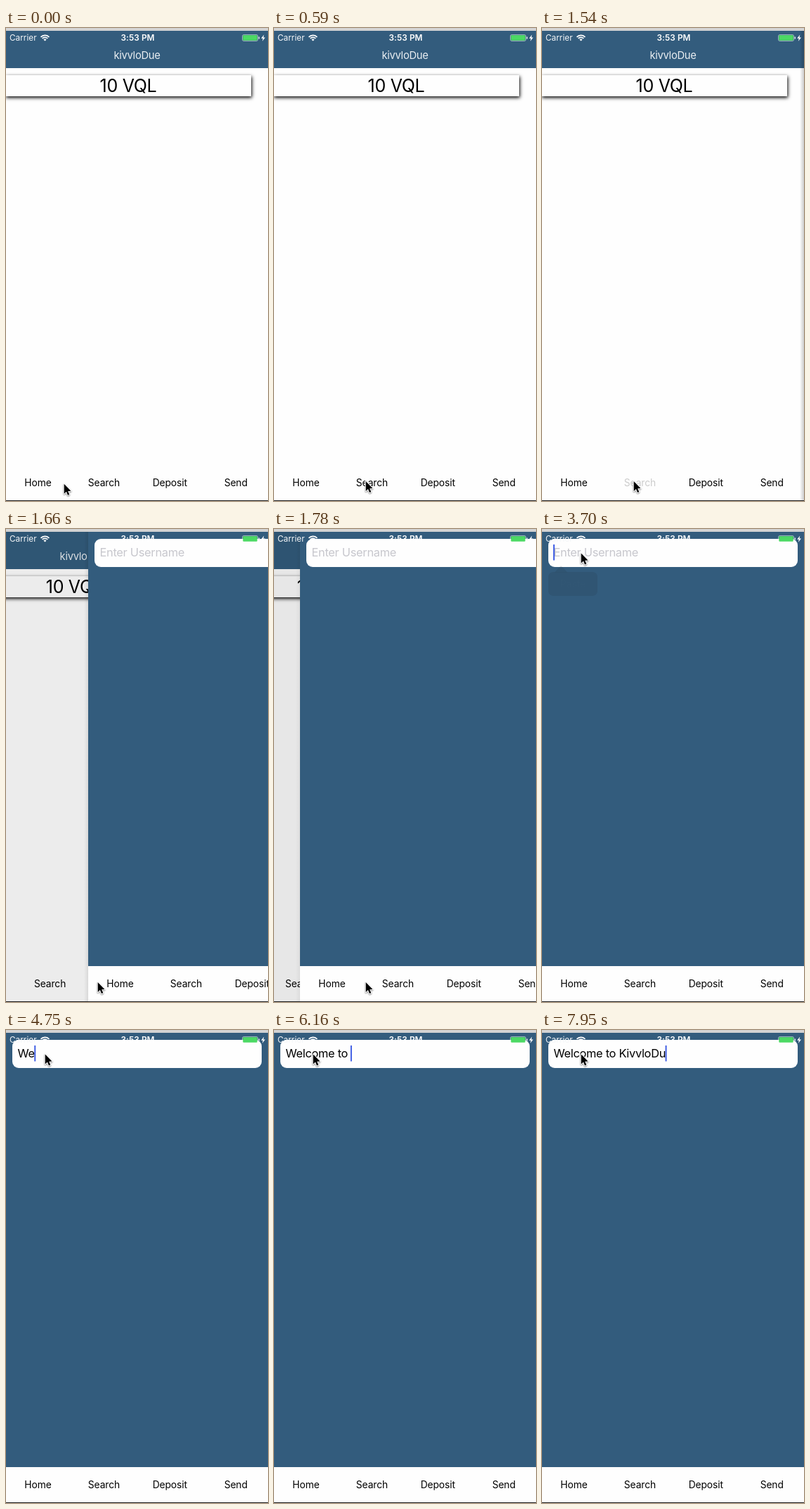
These frames come from a looping animation (373x672 px, 8000 ms). An HTML page with a canvas:

```html
<!DOCTYPE html>
<html lang="en">
<head>
<meta charset="utf-8">
<title>Wallet app</title>
<style>
  html, body { margin: 0; width: 100%; height: 100%; overflow: hidden; background: #fdfdfd; }
  canvas { display: block; width: 373px; height: 672px; }
</style>
</head>
<body>
<canvas id="stage"></canvas>
<script>
const W = 373, H = 672, LOOP = 8000;
const TICK = 118.4; // the screen refreshes once per tick
const BLUE = '#335c7d', WHITE = '#fefefe', MENU_COLOR = '#1b2024';

// Moments, counted in ticks
const PRESS = 7, SLIDE = 13, REACH_FIELD = 20, FOCUS = 27, MENU = 30, TYPE = 38;
const KEYS_PER_TICK = 'W||e|||lc|om||e||| |t|o| ||||K||i||v|v|l|o||D||u'.split('|');

const canvas = document.getElementById('stage');
const ctx = canvas.getContext('2d');
const ratio = window.devicePixelRatio || 1;
canvas.width = W * ratio;
canvas.height = H * ratio;

const clamp = v => Math.min(1, Math.max(0, v));
const ramp = (tick, start, length) => clamp((tick - start) / length);
const smooth = p => p * p * (3 - 2 * p);

function rect(x, y, w, h, fill) {
  ctx.fillStyle = fill;
  ctx.fillRect(x, y, w, h);
}

function rounded(x, y, w, h, r, fill) {
  ctx.beginPath();
  ctx.roundRect(x, y, w, h, r);
  ctx.fillStyle = fill;
  ctx.fill();
}

function polygon(points, fill) {
  ctx.beginPath();
  points.forEach(([x, y]) => ctx.lineTo(x, y));
  ctx.closePath();
  ctx.fillStyle = fill;
  ctx.fill();
}

function setShadow(color, blur, x, y) {
  ctx.shadowColor = color;
  ctx.shadowBlur = blur * ratio;
  ctx.shadowOffsetX = x * ratio;
  ctx.shadowOffsetY = y * ratio;
}

function setFont(size, spacing = 0, weight = 400) {
  ctx.font = `${weight} ${size}px Inter, sans-serif`;
  ctx.letterSpacing = spacing + 'px';
}

function label(text, x, y, fill, align = 'left') {
  ctx.textAlign = align;
  ctx.fillStyle = fill;
  ctx.fillText(text, x, y);
}

function withAlpha(alpha, paint) {
  ctx.save();
  ctx.globalAlpha = alpha;
  paint();
  ctx.restore();
}

function shifted(x, paint) {
  ctx.save();
  ctx.translate(x, 0);
  paint();
  ctx.restore();
}

function drawNav(searchAlpha = 1) {
  setFont(13.8, -0.1);
  ['Home', 'Search', 'Deposit', 'Send'].forEach((name, i) => {
    withAlpha(name === 'Search' ? searchAlpha : 1, () =>
      label(name, 45.5 + i * 93.9, 651, '#000', 'center'));
  });
}

function drawHome(tick) {
  rect(0, 4, W, H, WHITE);
  rect(0, 4, W, 53, BLUE);
  setFont(14.8, -0.3);
  label('kivvloDue', 186.5, 43.5, '#e9eef2', 'center');

  ctx.save();
  setShadow('#000', 5, 1, 2);
  rect(-1, 67, 350, 30, WHITE);
  ctx.restore();
  setFont(25, -0.3);
  label('10 VQL', 174, 91, '#000', 'center');
  drawNav(tick > SLIDE ? 1 : 1 - .8 * ramp(tick, PRESS, 2));
}

function drawMenu(alpha) {
  withAlpha(alpha, () => {
    rounded(9, 61, 70, 34, 7, MENU_COLOR);
    polygon([[18, 61.5], [27, 52], [36, 61.5]], MENU_COLOR);
  });
  setFont(14, -0.1);
  withAlpha(alpha * alpha, () => label('Paste', 44, 82.5, '#fff', 'center'));
}

function drawSearch(tick) {
  rect(0, 4, W, H, BLUE);
  rounded(9, 14, 355, 40, 9, WHITE);
  const typed = KEYS_PER_TICK.slice(0, Math.max(0, tick - TYPE + 1)).join('');
  setFont(16.4, -0.3);
  label(typed || 'Enter Username', 16.5, 39, typed ? '#000' : '#c7c7cd');

  const caretX = 16 + ctx.measureText(typed).width;
  const blink = clamp(.5 + 1.7 * Math.cos((tick - FOCUS) * Math.PI * 2 / 5));
  if (tick >= FOCUS) withAlpha(typed ? 1 : blink, () => rect(caretX, 22, 2, 22.5, '#4260e4'));

  const shown = ramp(tick, MENU, 3) ** 2 * (1 - ramp(tick, TYPE - 1, 2));
  drawMenu(shown);
  rect(0, 621, W, 51, WHITE);
  drawNav();
}

function drawScreens(tick) {
  if (tick < SLIDE) return drawHome(tick);
  const edge = Math.round(W * Math.pow(.3137, tick - SLIDE));
  const p = 1 - edge / W;
  shifted(-.3 * W * p, () => drawHome(tick));
  rect(0, 4, W, H, `rgba(0,0,0,${.1 * p})`);
  const shade = ctx.createLinearGradient(edge - 6, 0, edge, 0);
  shade.addColorStop(0, 'rgba(0,0,0,0)');
  shade.addColorStop(1, `rgba(0,0,0,${.2 - .17 * p})`);
  rect(edge - 6, 4, 6, H, shade);
  shifted(edge, () => drawSearch(tick));
}

function drawWifi(x, y) {
  const arc = r => ctx.arc(x, y, r, -Math.PI * .76, -Math.PI * .24);
  ctx.strokeStyle = ctx.fillStyle = '#fff';
  ctx.lineWidth = 1.7;
  for (const r of [5.2, 8.2]) {
    ctx.beginPath();
    arc(r);
    ctx.stroke();
  }
  ctx.beginPath();
  ctx.moveTo(x, y);
  arc(2.8);
  ctx.fill();
}

function drawBattery() {
  ctx.beginPath();
  ctx.roundRect(336.5, 9.5, 22, 9, 2);
  ctx.strokeStyle = 'rgba(255,255,255,.5)';
  ctx.lineWidth = 1;
  ctx.stroke();
  rounded(337.3, 10.3, 20.4, 7.4, 1, '#4cd964');
  rounded(359.5, 12.3, 1.5, 3.5, 1, '#dfe6eb');
  // The bolt is one half and the same half turned around
  const half = [[1.2, -4.6], [-2.9, .7], [-.3, .7]];
  const bolt = [...half, ...half.map(([x, y]) => [-x, -y])];
  polygon(bolt.map(([x, y]) => [366.1 + x, 14.1 + y]), '#fff');
}

function drawStatus() {
  setFont(11.8);
  label('Carrier', 5, 18.3, '#f4f6f8');
  setFont(11.8, 0.1, 600);
  label('3:53 PM', 187.5, 18.3, '#fff', 'center');
  drawWifi(55.5, 18.5);
  drawBattery();
}

function drawPointer(tick) {
  const toSearch = smooth(ramp(tick, 0, 5));
  const toField = smooth(ramp(tick, REACH_FIELD, 6));
  const outline = [[0, 0], [0, 14], [3.2, 11], [5.3, 16], [7.6, 15], [5.5, 10.2], [9.8, 10]];
  ctx.save();
  ctx.translate(82.7 + 48 * toSearch - 75 * toField, 647.7 - 3.7 * toSearch - 609.5 * toField);
  setShadow('rgba(0,0,0,.4)', 2, 0, 1);
  polygon(outline, '#000');
  ctx.strokeStyle = '#fff';
  ctx.lineWidth = 2;
  ctx.lineJoin = 'round';
  ctx.stroke();
  ctx.shadowColor = 'transparent';
  polygon(outline, '#000');
  ctx.restore();
}

function draw(time) {
  const tick = Math.floor((time + 8) / TICK);
  ctx.setTransform(ratio, 0, 0, ratio, 0, 0);
  drawScreens(tick);
  drawStatus();
  rect(0, 0, W, 4, '#d3d3d3');
  rect(0, 671, W, 1, '#1c1c1c');
  drawPointer(tick);
}

const start = performance.now();
function animate() {
  draw((performance.now() - start) % LOOP);
  requestAnimationFrame(animate);
}
animate();
</script>
</body>
</html>
```
